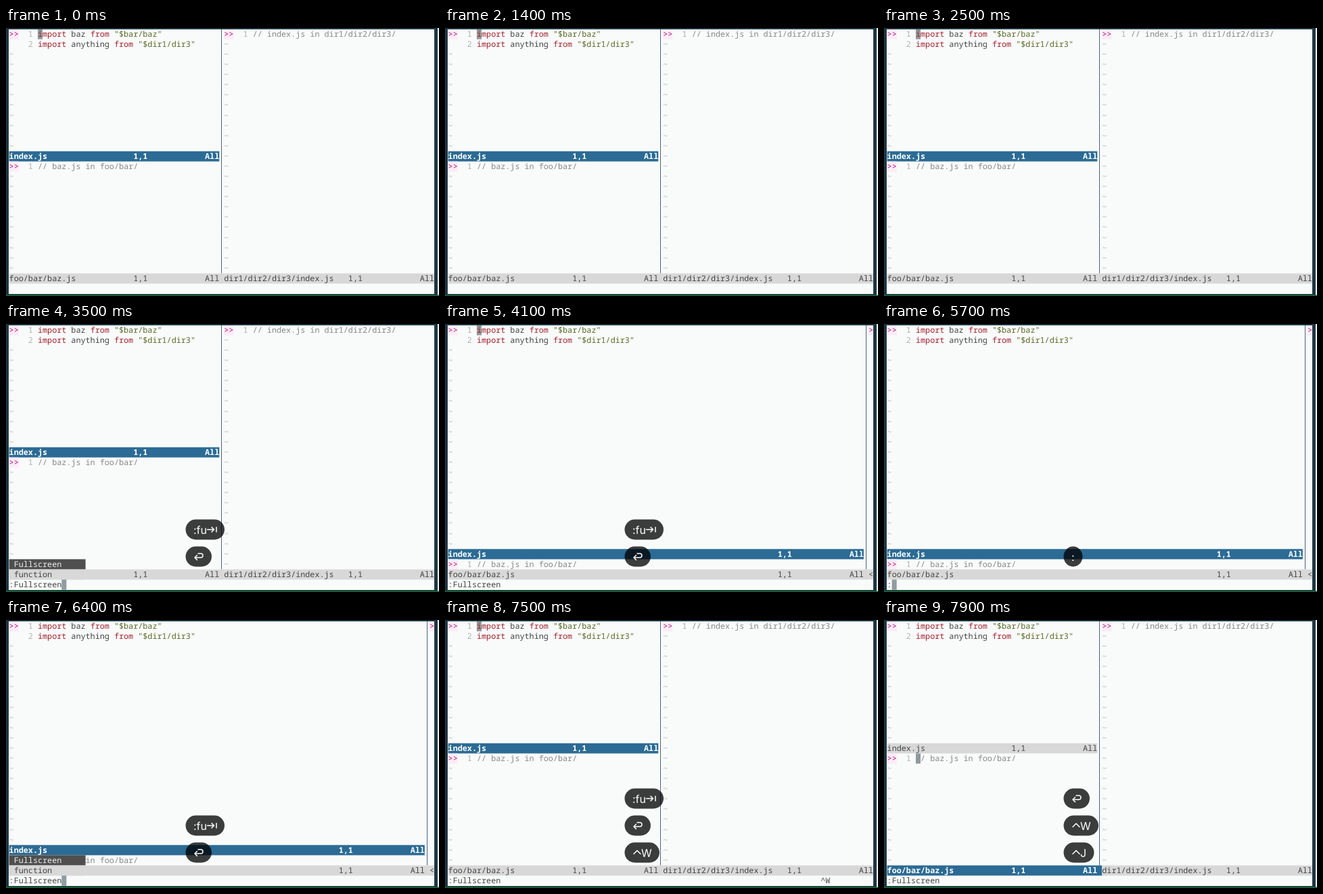
An HTML page for the animation above (8000 ms loop, 640 px wide and 397 px high).

```html
<!DOCTYPE html>
<html lang="en">
<head>
<meta charset="utf-8">
<title>Split window zoom</title>
<style>
  html, body { margin: 0; width: 100%; height: 100%; overflow: hidden; background: #f9fafa; }
  svg { display: block; width: 640px; height: 397px; }
  text { white-space: pre; text-rendering: geometricPrecision; }
  #grid text { font: 11.77px "Noto Sans Mono", "DejaVu Sans Mono", monospace; fill: #444; }
  #grid .on { fill: #fff; font-weight: 700; }
  #grid .light { fill: #eee; }
  #grid .sign { fill: #a8127c; }
  #grid .num { fill: #b0b2b2; }
  #grid .tilde { fill: #b4b8b8; }
  #grid .note { fill: #878787; }
  .kw { fill: #a3222c; }
  .str { fill: #566b25; }
  #keys rect { fill: #000; fill-opacity: .76; }
  #keys text { font: 16px Inter, "Open Sans", sans-serif; fill: #fff; }
  #keys path { fill: none; stroke: #fff; stroke-width: 1.5; stroke-linecap: round; stroke-linejoin: round; }
</style>
</head>
<body>
<svg viewBox="0 0 640 397">
  <rect width="640" height="397" fill="#f9fafa"/>
  <g id="grid"></g>
  <g id="frame" fill="#1f3643">
    <rect width="4" height="396"/>
    <rect width="638" height="2"/>
    <rect x="633" width="5" height="396"/>
    <rect y="394" width="638" height="2"/>
    <rect y="395.5" width="640" height="1.5" fill="#14692f"/>
  </g>
  <g id="keys"></g>
</svg>
<script>
const LOOP = 8000, COL = 7.06, ROW = 15.08, LEFT = 4.6, TOP = 1.6;
const BLUE = '#2b6b94', GREY = '#d8d8d8', DARK = '#4f4f4f', CURSOR = '#909c9e', PINK = '#fdebf6';
const grid = document.getElementById('grid');
const keys = document.getElementById('keys');

const colX = c => LEFT + c * COL;
const rowY = r => TOP + r * ROW;
const box = (c, r, w, fill) =>
  `<rect x="${colX(c)}" y="${rowY(r)}" width="${w * COL}" height="${ROW}" fill="${fill}"/>`;
const put = (c, r, str, cls = '') =>
  `<text x="${colX(c)}" y="${rowY(r) + 11.3}" class="${cls}">${str}</text>`;
const sign = (c, r, str = '&gt;&gt;') => box(c, r, str.length / 4, PINK) + put(c, r, str, 'sign');
const divider = (c, rows) => {
  const x = Math.floor(colX(c + .5)) + .5;
  return `<path d="M${x} ${TOP}V${rowY(rows)}" stroke="#4d6380"/>`;
};

function tildes(c, from, to) {
  let out = '';
  for (let r = from; r <= to; r++) out += put(c, r, '~', 'tilde');
  return out;
}

// Status line: name on the left, ruler 18 columns before the right edge
function status(c, r, w, name, active, extra = 0) {
  const cls = active ? 'on' : '';
  return box(c, r, w + extra, active ? BLUE : GREY) + put(c, r, name, cls) +
    put(c + (w < 60 ? 26 : w - 18), r, '1,1', cls) + put(c + w - 3, r, 'All', cls);
}

function code(name, dir) {
  return `<tspan class="kw">import</tspan> ${name} <tspan class="kw">from</tspan> ` +
    `<tspan class="str">"${dir}"</tspan>`;
}

function screen(s) {
  const width = s.full ? 87 : 44, split = s.full ? 22 : 12;
  let out = sign(0, 0) + put(4, 0, '1', 'num') + put(4, 1, '2', 'num');
  if (s.cursor === 'top') out += box(6, 0, 1, CURSOR);
  out += put(6, 0, code('baz', '$bar/baz')) + put(6, 1, code('anything', '$dir1/dir3'));
  out += tildes(0, 2, split - 1);
  out += status(0, split, width, 'index.js', !s.low);

  out += sign(0, split + 1) + put(4, split + 1, '1', 'num');
  if (s.cursor === 'low') out += box(6, split + 1, 1, CURSOR);
  out += put(6, split + 1, '// baz.js in foo/bar/', 'note');
  out += tildes(0, split + 2, 23) + divider(width, 24);
  out += status(0, 24, width, 'foo/bar/baz.js', s.low, 1);

  if (s.full) {
    out += sign(88, 0, '&gt;') + box(88, 24, 1, GREY) + put(88, 24, '&lt;');
  } else {
    out += sign(45, 0) + put(49, 0, '1', 'num') +
      put(51, 0, '// index.js in dir1/dir2/dir3/', 'note') + tildes(45, 1, 23) +
      status(45, 24, 44, 'dir1/dir2/dir3/index.js', false);
  }

  if (s.menu) {
    out += box(0, 23, 16, DARK) + put(1, 23, 'Fullscreen', 'light') +
      box(0, 24, 16, GREY) + put(1, 24, 'function');
  }
  if (s.cursor === 'cmd') out += box(s.cmd.length, 25, 1, CURSOR);
  return out + put(0, 25, s.cmd) + put(78, 25, s.pending || '');
}

const DONE = ':Fullscreen';
// Typing the command, completing it with Tab, then running it
const typing = (at, full) => [
  [at, { full, cmd: ':', cursor: 'cmd' }],
  [at + 100, { full, cmd: ':f', cursor: 'cmd' }],
  [at + 200, { full, cmd: ':fu', cursor: 'cmd' }],
  [at + 300, { full, cmd: DONE, cursor: 'cmd', menu: true }],
  [at + 900 - (full ? 100 : 0), { full: !full, cmd: DONE, cursor: 'top' }]
];
const scenes = [
  [0, { cmd: '', cursor: 'top' }],
  ...typing(2700, false),
  ...typing(5700, true),
  [7200, { cmd: DONE, cursor: 'top', pending: '^W' }],
  [7800, { cmd: DONE, cursor: 'low', low: true }]
];

const HOLD = 1700, FADE = 200;
const label = (x, str) => `<text x="${x}" y="6">${str}</text>`;
const icon = d => `<path d="${d}"/>`;
const caret = icon('M13.5 2l5-5 5 5');
const faces = {
  ':': [28, label(11.5, ':')],
  ':f': [34, label(11.5, ':f')],
  ':fu': [43, label(11.5, ':fu')],
  tab: [57.5, label(11.5, ':fu') + icon('M32 0h10M38.5-3.5l3.5 3.5-3.5 3.5M45.5-3.5v7')],
  enter: [38.5, icon('M17-2l-3.5 3.5L17 5M14 1.5h8.5a3 3 0 0 0 0-6h-4')],
  w: [51.5, caret + label(24.5, 'W')],
  j: [45, caret + label(24.5, 'J')]
};
// Each pill: its faces in order, with the time of each key press
const command = at => [[at, ':'], [at + 100, ':f'], [at + 200, ':fu'], [at + 300, 'tab']];
const pills = [
  command(2700), [[3400, 'enter']],
  command(5700), [[6300, 'enter']],
  [[7200, 'w']], [[7800, 'j']]
];

function pill(steps, t, slot) {
  const last = steps[steps.length - 1][0];
  const alpha = Math.min(1, 1 - (t - last - HOLD) / FADE);
  if (alpha <= 0) return '';
  const [w, art] = faces[steps.filter(k => k[0] <= t).pop()[1]];
  return `<g transform="translate(265.5 ${344.5 - slot * 40})" opacity="${alpha.toFixed(2)}">` +
    `<rect y="-15" width="${w}" height="30" rx="15"/>${art}</g>`;
}

let shownScene, shownKeys;
function draw(now) {
  const t = now % LOOP;
  const scene = scenes.filter(s => s[0] <= t).pop()[1];
  if (scene !== shownScene) grid.innerHTML = screen(shownScene = scene);

  const live = pills.filter(p => p[0][0] <= t);
  const art = live.map((p, i) => pill(p, t, live.length - 1 - i)).join('');
  if (art !== shownKeys) keys.innerHTML = shownKeys = art;
  requestAnimationFrame(draw);
}
draw(0);
</script>
</body>
</html>
```
